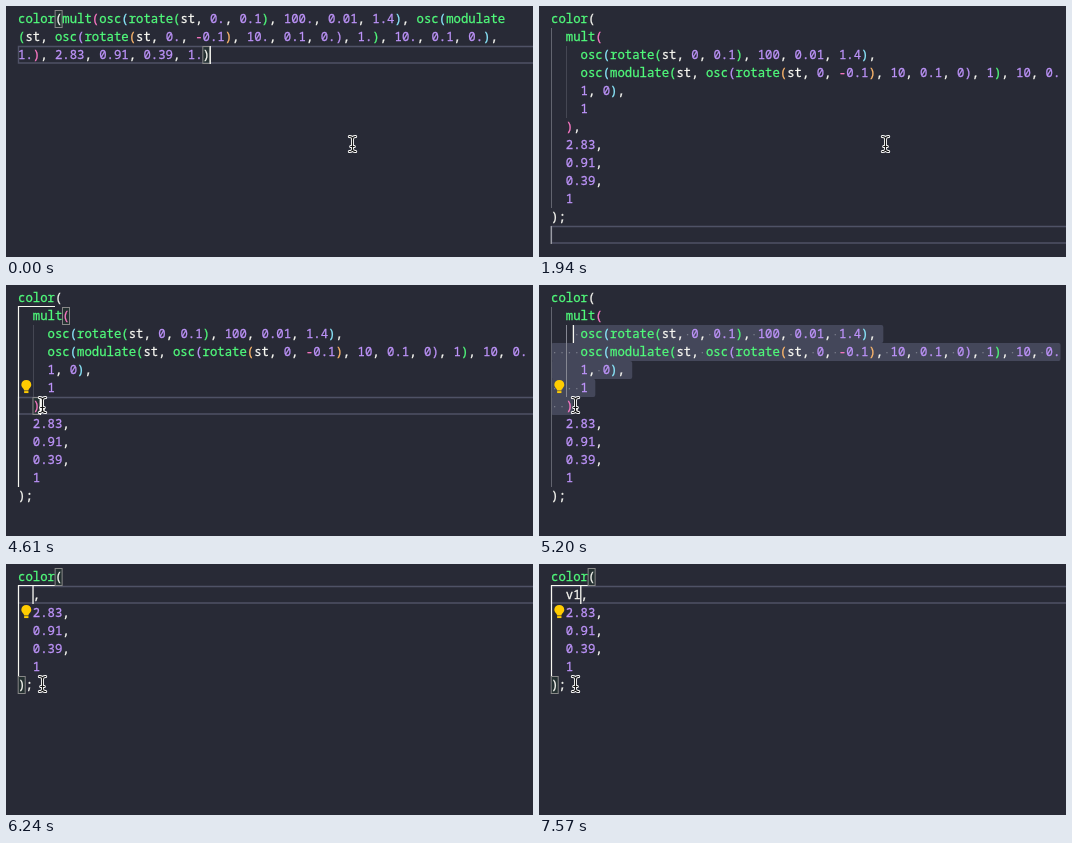
These frames come from a looping animation (527 px wide and 251 px high, 8 s). An HTML page:

```html
<!DOCTYPE html>
<html>
<head>
<meta charset="utf-8">
<style>
  html, body { margin: 0; width: 100%; height: 100%; overflow: hidden; background: #282a36; }
  svg { display: block; width: 527px; height: 251px; }
  text { font: 12.31px "Noto Sans Mono", monospace; white-space: pre; color: #f8f8f2; }
  text, tspan { fill: currentColor; stroke: currentColor; stroke-width: .28; }
</style>
</head>
<body>
<svg id="stage" viewBox="0 0 527 251"></svg>
<script>
const LOOP = 8000, CW = 7.385, LH = 18, LEFT = 12, TOP = 4;
const FG = '#f8f8f2', DIM = '#44475a';
const BRACKETS = [FG, '#ff79c6', '#8be9fd', '#50fa7b', '#bd93f9', '#ffb86c'];

const raw = `color(mult(osc(rotate(st, 0., 0.1), 100., 0.01, 1.4), osc(modulate
(st, osc(rotate(st, 0., -0.1), 10., 0.1, 0.), 1.), 10., 0.1, 0.),
1.), 2.83, 0.91, 0.39, 1.)`;
const mult = `mult(
    osc(rotate(st, 0, 0.1), 100, 0.01, 1.4),
    osc(modulate(st, osc(rotate(st, 0, -0.1), 10, 0.1, 0), 1), 10, 0.
    1, 0),
    1
  )`;
const wrap = arg => `color(\n  ${arg},\n  2.83,\n  0.91,\n  0.39,\n  1\n);`;
const items = ['var', 'visualViewport', 'void', 'VBArray', 'VTTCue', 'VTTRegion', 'ValidityState',
  'VarDate', 'VideoColorSpace', 'VideoDecoder', 'VideoEncoder', 'VideoFrame'];

const X = col => LEFT + col * CW;
const Y = line => TOP + line * LH;
const rect = (x, y, w, h, fill, more = '') =>
  `<rect x="${x}" y="${y}" width="${w}" height="${h}" fill="${fill}" ${more}/>`;
const path = (d, stroke, w = 1, more = 'fill="none"') =>
  `<path d="${d}" stroke="${stroke}" stroke-width="${w}" ${more}/>`;
const text = (x, y, s, style = '') => `<text x="${x}" y="${y}" style="${style}">${s}</text>`;
const span = (s, color) => `<tspan style="color:${color}">${s}</tspan>`;

function highlight(doc) {
  let depth = 0;
  return doc.replace(/[a-z]\w*|\d+\.?\d*|[()-]/g, (tok, at) => {
    if (tok === '(') return span(tok, BRACKETS[depth++ % 6]);
    if (tok === ')') return span(tok, BRACKETS[--depth % 6]);
    if (tok === '-') return span(tok, '#ff79c6');
    if (/^\d/.test(tok)) return span(tok, '#bd93f9');
    if (tok === 'var') return 'v' + span('ar', '#85868f');
    return /^\s*\(/.test(doc.slice(at + tok.length)) ? span(tok, '#50fa7b') : tok;
  }).split('\n').map((s, i) => text(LEFT, Y(i) + 13, s)).join('');
}

const currentLine = line => path(`M528 ${Y(line) + .5}H12.5V${Y(line) + 17}H528`, '#4f5266', 1.4);
const match = (line, col) =>
  rect(X(col) + .2, Y(line) + .5, 7, 17, 'rgba(0,100,0,.1)', 'stroke="#888"');
const caret = (line, col, alpha) => rect(X(col) - .4, Y(line), 1.3, LH, FG, `opacity="${alpha}"`);
const bulb = line => `<g transform="translate(20.3 ${Y(line) + 7.8}) scale(1.08)">
  <path d="M-2 3.4C-2 1.8-4.6.9-4.6-1.8A4.6 4.6 0 0 1 4.6-1.8C4.6.9 2 1.8 2 3.4Z" fill="#fc0"/>
  ${rect(-2, 4, 4, 1.8, '#fc0')}</g>`;

function guides(last, active) {
  return active ? path(`M12.5 ${Y(last)}V21.5H49`, FG, 1.2) : path(`M12.5 ${Y(last)}V22`, '#62646f');
}

// Selected region from the caret down to the closing bracket of mult
function selection(doc, line, col) {
  let out = '', dots = '';
  doc.split('\n').forEach((s, i) => {
    if (i < line || i > 6) return;
    const a = i === line ? col : 0;
    const b = i === 6 ? 3 : s.length + (i !== 3);
    out += rect(X(a), Y(i), (b - a) * CW, LH, DIM, 'rx="2"');
    for (let c = i === 4 ? 4 : a; c < Math.min(b, s.length); c++)
      if (s[c] === ' ') dots += rect(X(c) + 3, Y(i) + 9, 1.3, 1.3, '#777a88');
  });
  return out + dots;
}

function icon(name, y) {
  if (name === 'var' || name === 'void')
    return path(`M38 ${y - 4}h5m2 0h6M38 ${y - .5}h8m2 0h2M38 ${y + 3}h3m2 0h7M38 ${y + 5.5}h10`, '#d0d0d0', 1.2);
  if (name === 'VarDate')
    return path(`M39 ${y - 1}l4-4 3 3-4 4zM44 ${y}h3M44 ${y}v4h3M47 ${y}l2-2 2 2-2 2zM47 ${y + 4}l2-2 2 2-2 2z`, '#ee9d28', 1.2);
  return path(`M40.5 ${y - 4.5}h-2v9h2M49 ${y - 4.5}h2v9h-2M42 ${y - 1}l3.5-2 3 1.5v3l-3.5 2-3-1.5zM42 ${y - 1}l3 1.5 3.5-2M45 ${y + .5}v3`, '#75beff', 1.1);
}

function popup() {
  let out = rect(34.5, 40.5, 431, 230, '#232427', 'stroke="#3c3d42"');
  out += rect(35, 41, 430, 17.5, DIM) + rect(35, 113, 430, 18, '#2e303c') + rect(455, 41, 10, 80, 'rgba(121,121,121,.25)');
  items.forEach((s, i) => {
    const y = 49.5 + i * LH;
    out += icon(s, y) + text(57, y + 4.3, span(s[0], '#5cc4f5;font-weight:700') + s.slice(1));
  });
  return out + text(436, 53, 'var', 'font-size:10.4px;color:#b4b5bb');
}

function beam(x, y) {
  const d = 'M-3.2-7.5Q0-7.5 0-5Q0-7.5 3.2-7.5M0-5.5V5.5M-3.2 7.5Q0 7.5 0 5Q0 7.5 3.2 7.5M-1.8 2.5H1.8';
  return `<g transform="translate(${x} ${y})" stroke-linecap="round">${path(d, '#fff', 3)}${path(d, '#111', 1.2)}</g>`;
}
const hand = path('M36 127V121.5Q36 120 37.2 120Q38.4 120 38.4 121.5V125Q40 124 41 125.4Q42.6 124.8 43.2 126.2Q45 126 45 128V131Q44.5 134 43 136H37Q35.5 132.5 33 130Q32 128.2 33.4 127.8Q34.6 127.6 36 129.5Z',
  '#111', 1, 'fill="#fff"');

// Fades out and in again through a half-lit step
function blink(t) {
  const [a, b, c, d] = t < 1190 ? [300, 450, 740, 890] : [1940, 2090, 2390, 2530];
  return t < a || t >= d ? 1 : t >= b && t < c ? 0 : .5;
}

function pointer(t) {
  const k = Math.max(0, Math.min(1, (Math.floor((t - 2830) / 148.5) + 1) / 7));
  const e = k * k * (3 - 2 * k);
  return beam(346.5 - 310 * e, 138 - 18 * e);
}

function editing(t) {
  const error = t >= 6540 && t < 7130, open = t >= 6840 && t < 7570;
  const arg = t < 6840 ? '' : t < 7280 ? 'var' : 'v1';
  const col = t < 6840 ? 2 : t < 7280 ? 3 : 4;
  let out = '';
  if (error) {
    const end = X(3 + arg.length);
    out += rect(12, 22, 515, 18, 'rgba(228,85,84,.15)')
      + text(end + 4 * CW + .5, 35, 'Argument expression expected.', 'color:#ff6464')
      + path(`M${end - CW} 38l2-2 2 2 2-2 2 2`, '#f55');
  }
  return out + currentLine(1) + guides(6, true) + match(0, 5) + match(6, 0)
    + highlight(wrap(arg)) + caret(1, col, 1) + bulb(2) + (open ? popup() + hand : beam(36.5, 120));
}

function formatted(t) {
  const doc = wrap(mult), clicked = t >= 3870, selecting = t >= 4760;
  let line = 12, col = 0;
  if (clicked) [line, col] = [6, 3];
  if (selecting) line = Math.max(1, 5 - Math.floor((t - 4760) / 146.6));
  if (t >= 5790) col = 2;
  const inner = selecting && line > 1;
  let out = selecting ? selection(doc, line, col) : currentLine(line);
  out += guides(11, clicked && !inner) + path('M27.5 40V112', inner ? '#858792' : '#454753');
  if (t >= 4020 && !selecting) out += match(1, 6) + match(6, 2);
  out += highlight(doc) + caret(line, col, blink(t));
  if (t >= 4170 && t < 5500) out += bulb(5);
  return out + pointer(t);
}

function draw(t) {
  if (t >= 6240) return editing(t);
  if (t >= 1190) return formatted(t);
  return currentLine(2) + match(0, 5) + match(2, 25) + highlight(raw) + caret(2, 26, blink(t)) + pointer(t);
}

const stage = document.getElementById('stage');
let shown, start;
function tick(now) {
  start ??= now;
  const next = draw((now - start) % LOOP);
  if (next !== shown) stage.innerHTML = shown = next;
  requestAnimationFrame(tick);
}
requestAnimationFrame(tick);
</script>
</body>
</html>
```
